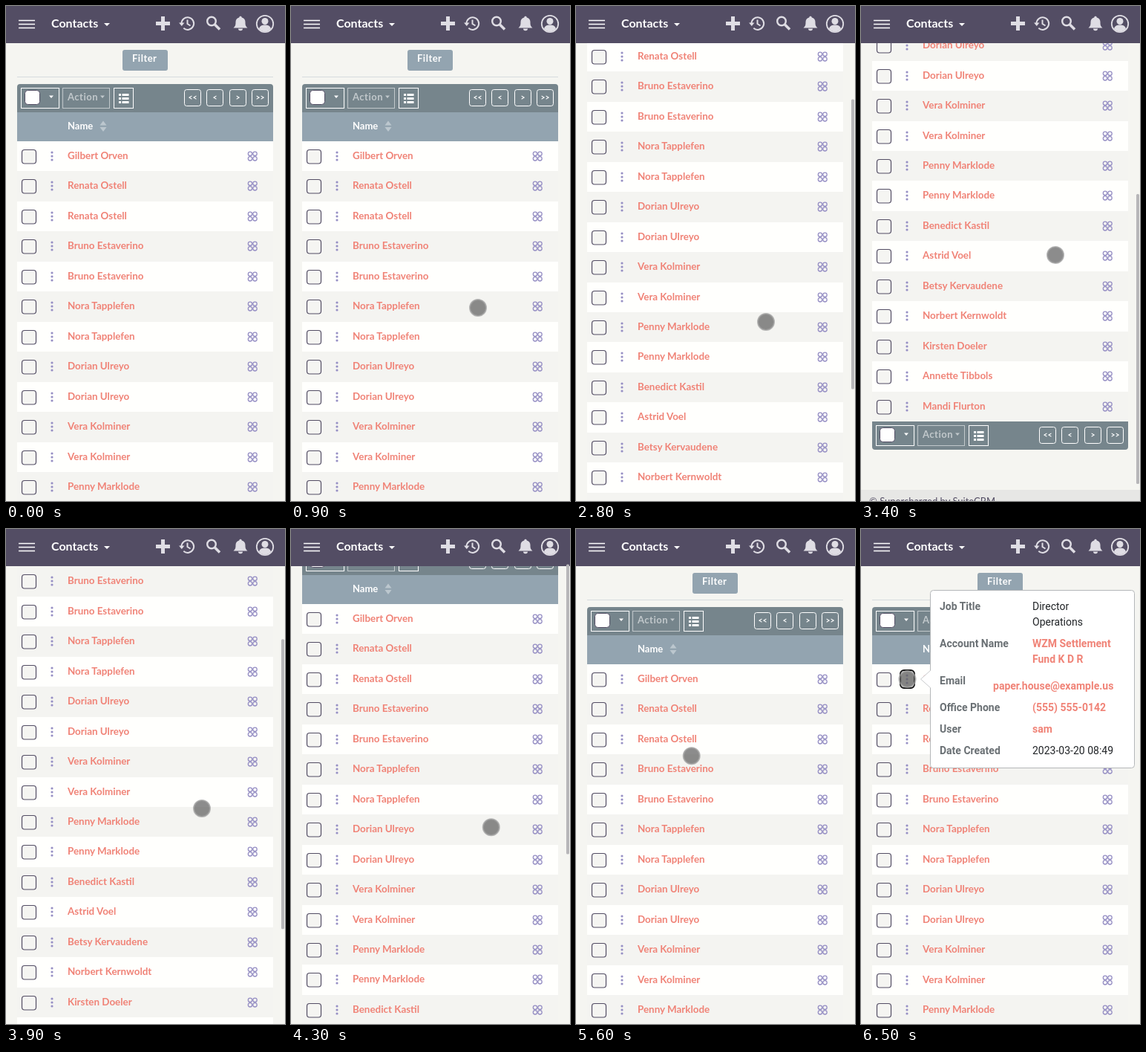
These frames come from a looping animation (376 by 666 pixels, 8000 ms). An HTML page:

```html
<!DOCTYPE html>
<html lang="en">
<head>
<meta charset="utf-8">
<title>Contacts</title>
<style>
html, body { margin: 0; width: 100%; height: 100%; overflow: hidden; background: #f5f5f1; }
svg { display: block; width: 376px; height: 666px; }
text { font: bold 13px Lato, sans-serif; fill: #fff; }
.name { font-size: 13.4px; fill: #f08377; }
.wide { letter-spacing: .5px; }
.page { font-size: 10.5px; text-anchor: middle; }
.foot { font-weight: 400; fill: #534d64; }
#pop text { font: bold 14px Roboto, sans-serif; fill: #6a7074; }
#pop .plain { font-weight: 400; fill: #212427; }
#pop .link { fill: #f08377; }
.line { fill: none; stroke: #fff; }
.icon { fill: none; stroke: #dfdde4; }
.solid { fill: #dfdde4; }
</style>
</head>
<body>
<svg viewBox="0 0 376 666">
  <defs>
    <g id="tools">
      <rect class="line" x="20.5" y="5.5" width="51" height="27"/>
      <rect x="25.5" y="8.5" width="20" height="19" rx="4" fill="#fff" stroke="#534d64"/>
      <path d="M58 15.5h6l-3 3.5z" fill="#fff"/>
      <g opacity=".55">
        <rect class="line" x="76.5" y="5.5" width="63" height="27"/>
        <text class="wide" x="83" y="22">Action</text>
        <path d="M127 15.5h6l-3 3.5z" fill="#fff"/>
      </g>
      <rect class="line" x="145.5" y="5.5" width="26" height="27"/>
      <path d="M152 14.5h3m1.5 0h9M152 19.5h3m1.5 0h9M152 24.5h3m1.5 0h9" class="line" stroke-width="2.8"/>
      <g id="pager"></g>
    </g>
    <g id="row">
      <rect x="21.5" y="11.5" width="19" height="18.5" rx="3.5" fill="#f5f5f2" stroke="#534d64" stroke-width="1.2"/>
      <g fill="#968fc4">
        <circle cx="62" cy="15" r="1.6"/><circle cx="62" cy="20" r="1.6"/><circle cx="62" cy="25" r="1.6"/>
      </g>
      <g fill="none" stroke="#968fc4" stroke-width="1.3">
        <circle cx="329" cy="16.8" r="2.7"/><circle cx="335.5" cy="16.8" r="2.7"/>
        <circle cx="329" cy="23.3" r="2.7"/><circle cx="335.5" cy="23.3" r="2.7"/>
      </g>
    </g>
  </defs>

  <rect width="376" height="666" fill="#f5f5f1"/>
  <g id="content">
    <rect x="157" y="59" width="61" height="28" rx="3" fill="#93a4b0"/>
    <text class="wide" x="170" y="75">Filter</text>
    <path d="M15 95.5h345" stroke="#d6dbde"/>
    <path d="M15 143v-34a4 4 0 0 1 4-4h337a4 4 0 0 1 4 4v34z" fill="#76858c"/>
    <use href="#tools" y="105"/>
    <path d="M15 143h345v39H15z" fill="#93a4b0"/>
    <text x="83" y="166">Name</text>
    <path d="M126.5 160.5h9l-4.5-6zM126.5 163h9l-4.5 6z" fill="#bcc7ce"/>
    <g id="rows"></g>
    <path d="M15 991h345v34a4 4 0 0 1-4 4H19a4 4 0 0 1-4-4z" fill="#76858c"/>
    <use href="#tools" y="991"/>
    <path d="M0 1083h376v54H0z" fill="#e7e7e5"/>
    <text class="foot" x="11" y="1103">© Supercharged by SuiteCRM</text>
    <rect id="focus" x="53" y="190" width="19" height="24" rx="5" fill="#aaa" fill-opacity=".3" stroke="#111" stroke-width="2"/>
  </g>

  <rect width="376" height="50" fill="#534d64"/>
  <path d="M17 19.5h22M17 24.5h22M17 29.5h22" class="line" stroke-width="1.4"/>
  <text x="61" y="29" style="font-size:16px">Contacts</text>
  <path d="M132 23h8l-4 4z" fill="#fff"/>
  <path d="M202 23.5h19M211.5 14v19" class="icon" stroke-width="5"/>
  <path d="M236.5 24a8.3 8.3 0 1 1 2.8 5.8M244.5 18.5v5.5l4 2.5" class="icon" stroke-width="2"/>
  <path d="M233 22.5h7.5l-3.7 4.5z" class="solid"/>
  <circle cx="277" cy="20.5" r="5.8" class="icon" stroke-width="2.4"/>
  <path d="M281.5 25l6.5 6.5" class="icon" stroke-width="3.6"/>
  <path d="M306.5 29.5c3-2.5 3-5 3-8 0-3.5 2-5.5 4.7-6 0-2.2 3.6-2.2 3.6 0 2.7.5 4.7 2.5 4.7 6 0 3 0 5.5 3 8zM313 30.5h6a3 2.8 0 0 1-6 0z" class="solid"/>
  <circle cx="349" cy="24" r="11.2" class="icon" stroke-width="1.8"/>
  <circle cx="349" cy="20.5" r="4.5" class="solid"/>
  <path d="M341 30.5c1-4 4-5 8-5s7 1 8 5a10 10 0 0 1-16 0z" class="solid"/>

  <rect id="thumb" x="371" width="4" height="390" rx="1.5" fill="#b7b6b9"/>
  <g id="pop">
    <rect x="93.5" y="82.5" width="275" height="239" rx="4" fill="#fff" stroke="#b4b7b9"/>
    <path d="M94 190l-13.5 12 13.5 12" fill="#fff" stroke="#c9cbcd"/>
  </g>
  <circle id="cursor" r="11" fill="#555" fill-opacity=".68" stroke="#a2a2a2" stroke-opacity=".75" stroke-width="2"/>
</svg>
<script>
const $ = id => document.getElementById(id);
const label = (x, y, s, cls) => `<text x="${x}" y="${y}" class="${cls}">${s}</text>`;

$('pager').innerHTML = ['&lt;&lt;', '&lt;', '&gt;', '&gt;&gt;'].map((s, i) => {
  const x = 240.5 + Math.round(i * 30.3);
  return `<rect class="line" x="${x}" y="7.5" width="22" height="22" rx="3"/>` + label(x + 11, 22, s, 'page');
}).join('');

const pairs = ['Renata Ostell', 'Bruno Estaverino', 'Nora Tapplefen', 'Dorian Ulreyo', 'Vera Kolminer', 'Penny Marklode'];
const names = ['Gilbert Orven', ...pairs.flatMap(n => [n, n]), 'Benedict Kastil', 'Astrid Voel',
  'Betsy Kervaudene', 'Norbert Kernwoldt', 'Kirsten Doeler', 'Annette Tibbols', 'Mandi Flurton'];
const rowY = i => Math.round(182 + i * 40.45);
$('rows').innerHTML = names.map((n, i) => {
  const y = rowY(i), fill = i % 2 ? '#f4f4f1' : '#fffffd';
  return `<rect x="15" y="${y}" width="345" height="${rowY(i + 1) - y}" fill="${fill}"/>` +
    `<use href="#row" y="${y}"/>` + label(83, y + 24, n, 'name');
}).join('');

$('pop').innerHTML += [
  [106, 109, 'Job Title', ''], [231, 109, 'Director', 'plain'], [231, 130, 'Operations', 'plain'],
  [106, 159, 'Account Name', ''], [231, 159, 'WZM Settlement', 'link'], [231, 180, 'Fund K D R', 'link'],
  [106, 209, 'Email', ''], [178, 216, 'paper.house@example.us', 'link'],
  [106, 245, 'Office Phone', ''], [231, 245, '(555) 555-0142', 'link'],
  [106, 274, 'User', ''], [231, 274, 'sam', 'link'],
  [106, 303, 'Date Created', ''], [231, 303, '2023-03-20 08:49', 'plain']
].map(a => label(...a)).join('');

// Keyframes: [time, value, ...]
const scroll = [[2000, 0], [2100, 82], [2200, 130], [2300, 164], [2500, 198], [2800, 214.5], [3000, 290],
  [3200, 385], [3400, 432], [3500, 420], [3900, 253], [4300, 81], [4700, 8], [4800, 8], [5000, 0]];
const path = [[500, 172, 229], [900, 252, 406], [1600, 252, 406], [2000, 248, 396], [2100, 237, 314],
  [2400, 236, 250], [2800, 256, 425], [3400, 262, 335], [3900, 264, 376], [4200, 268, 435], [4600, 275, 300],
  [4700, 276, 310], [4800, 276, 310], [5000, 280, 443], [5200, 280, 443], [5900, 62.5, 202]];

function at(keys, t) {
  const i = keys.findIndex(k => k[0] > t);
  if (i < 0) return keys[keys.length - 1].slice(1);
  if (!i) return keys[0].slice(1);
  const a = keys[i - 1], b = keys[i], f = (t - a[0]) / (b[0] - a[0]);
  return a.slice(1).map((v, j) => v + (b[j + 1] - v) * f);
}
const fade = (id, v) => $(id).setAttribute('opacity', v);

const start = performance.now();
function draw() {
  // The motion advances in tenths of a second.
  const t = Math.floor((performance.now() - start) % 8000 / 100) * 100;
  const [y] = at(scroll, t), [cx, cy] = at(path, t);
  $('content').setAttribute('transform', `translate(0 ${-Math.round(y)})`);
  $('thumb').setAttribute('y', y * .5856);
  $('cursor').setAttribute('transform', `translate(${cx} ${cy})`);
  fade('thumb', t < 2100 || t >= 5600 ? 0 : t === 5500 ? .5 : 1);
  fade('cursor', t < 500 ? 0 : 1);
  fade('focus', t < 6300 ? 0 : 1);
  fade('pop', t < 6400 ? 0 : t < 6500 ? .6 : 1);
  requestAnimationFrame(draw);
}
draw();
</script>
</body>
</html>
```
